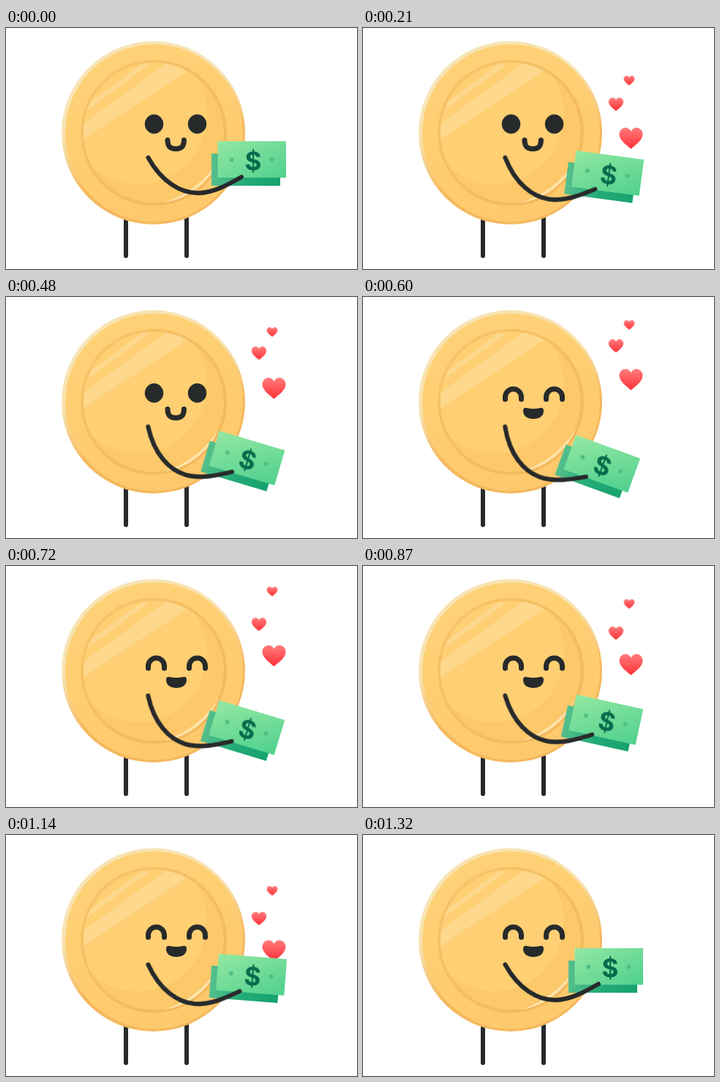
These frames come from a looping animation (480x330 px, 1380 ms). An HTML page without scripts:

```html
<!DOCTYPE html>
<html lang="en">
<head>
<meta charset="utf-8">
<title>Happy coin</title>
<style>
  html, body { margin: 0; width: 100%; height: 100%; overflow: hidden; background: #fff; }
  svg { display: block; width: 480px; height: 330px; }

  .arm, .hearts, .heart, .calm, .happy { animation: 1380ms linear infinite; }
  .arm { transform-origin: 194px 177px; animation-name: swing; }
  .hearts { animation-name: fade; }
  .large { animation-name: rise-large; }
  .medium { animation-name: rise-medium; }
  .small { animation-name: rise-small; }
  .calm, .happy { animation-timing-function: step-end; }
  .calm { animation-name: calm; }
  .happy { animation-name: happy; }

  .line { fill: none; stroke: #272a2b; stroke-width: 6; stroke-linecap: round; stroke-linejoin: round; }
  .thick { stroke-width: 7; }
  .dark { fill: #272a2b; }
  .dollar { font: 700 35px Inter, sans-serif; text-anchor: middle; fill: #056b4b; }

  /* Motion advances on a 30 ms beat */
  @keyframes swing {
    0% { transform: rotate(0deg); animation-timing-function: steps(7); }
    15.21% { transform: rotate(7.6deg); animation-timing-function: steps(9); }
    34.78% { transform: rotate(16.6deg); animation-timing-function: steps(4); }
    43.47% { transform: rotate(20deg); animation-timing-function: steps(4); }
    52.17% { transform: rotate(16.9deg); animation-timing-function: steps(5); }
    63.04% { transform: rotate(12.4deg); animation-timing-function: steps(9); }
    82.6% { transform: rotate(4.5deg); animation-timing-function: steps(6); }
    95.65%, 100% { transform: rotate(0deg); }
  }
  @keyframes rise-large {
    0% { transform: translateY(171px); animation-timing-function: steps(7); }
    15.21% { transform: translateY(151px); animation-timing-function: steps(9); }
    34.78% { transform: translateY(125px); animation-timing-function: steps(4); }
    43.47% { transform: translateY(113px); animation-timing-function: steps(4); }
    52.17% { transform: translateY(123px); animation-timing-function: steps(5); }
    63.04% { transform: translateY(135px); animation-timing-function: steps(9); }
    82.6% { transform: translateY(158.5px); animation-timing-function: steps(6); }
    95.65%, 100% { transform: translateY(172px); }
  }
  @keyframes rise-medium {
    0% { transform: translateY(125px); animation-timing-function: steps(7); }
    15.21% { transform: translateY(104.5px); animation-timing-function: steps(9); }
    34.78% { transform: translateY(77px); animation-timing-function: steps(4); }
    43.47% { transform: translateY(67px); animation-timing-function: steps(4); }
    52.17% { transform: translateY(80px); animation-timing-function: steps(5); }
    63.04% { transform: translateY(92px); animation-timing-function: steps(9); }
    82.6% { transform: translateY(114.5px); animation-timing-function: steps(6); }
    95.65%, 100% { transform: translateY(128px); }
  }
  @keyframes rise-small {
    0% { transform: translateY(91px); animation-timing-function: steps(7); }
    15.21% { transform: translateY(72px); animation-timing-function: steps(9); }
    34.78% { transform: translateY(48px); animation-timing-function: steps(7); }
    50% { transform: translateY(31px); animation-timing-function: steps(1); }
    52.17% { transform: translateY(35px); animation-timing-function: steps(5); }
    63.04% { transform: translateY(52px); animation-timing-function: steps(9); }
    82.6% { transform: translateY(76.5px); animation-timing-function: steps(6); }
    95.65%, 100% { transform: translateY(92px); }
  }
  @keyframes fade {
    0% { opacity: 0; animation-timing-function: steps(5); }
    10.86% { opacity: 1; }
    84.78% { opacity: 1; animation-timing-function: steps(5); }
    95.65%, 100% { opacity: 0; }
  }
  @keyframes calm { 0% { opacity: 1; } 43.47%, 100% { opacity: 0; } }
  @keyframes happy { 0% { opacity: 0; } 43.47%, 100% { opacity: 1; } }
</style>
</head>
<body>
<svg viewBox="0 0 480 330">
  <defs>
    <linearGradient id="rim" x1=".3" y1="0" x2=".7" y2="1">
      <stop offset=".35" stop-color="#f7e4b4"/>
      <stop offset=".65" stop-color="#f5b85d"/>
    </linearGradient>
    <linearGradient id="body" x1=".3" y1="0" x2=".7" y2="1">
      <stop stop-color="#ffd277"/>
      <stop offset="1" stop-color="#fec86b"/>
    </linearGradient>
    <linearGradient id="groove" x1=".1" y1=".1" x2=".9" y2=".9">
      <stop stop-color="#f6c469"/>
      <stop offset="1" stop-color="#f3b75b"/>
    </linearGradient>
    <linearGradient id="front" x2="1" y2="1">
      <stop stop-color="#93e8a2"/>
      <stop offset="1" stop-color="#4fd08e"/>
    </linearGradient>
    <linearGradient id="back">
      <stop stop-color="#55bf8c"/>
      <stop offset=".5" stop-color="#23ab77"/>
      <stop offset="1" stop-color="#17a26e"/>
    </linearGradient>
    <linearGradient id="red" x2="0" y2="1">
      <stop stop-color="#ff7c7c"/>
      <stop offset="1" stop-color="#ff3037"/>
    </linearGradient>
    <clipPath id="inside"><circle cx="202" cy="143.5" r="96"/></clipPath>
    <path id="heart" fill="url(#red)" d="M0 14.5C-6 9-16 3-16-5.5c0-5 4-9 8.5-9 3.5 0 6 2 7.5 5 1.5-3 4-5 7.5-5 4.5 0 8.5 4 8.5 9C16 3 6 9 0 14.5z"/>
    <path id="smiling-eye" d="M194.500 140v-3a11 11 0 0 1 22 0v3"/>
  </defs>

  <path class="line" d="M164 255V312M247 255V312"/>

  <g id="coin">
    <circle cx="201.500" cy="143.500" r="125.500" fill="url(#rim)"/>
    <circle cx="202.500" cy="144" r="121.500" fill="url(#body)"/>
    <circle cx="202" cy="143.500" r="100" fill="url(#groove)"/>
    <g clip-path="url(#inside)">
      <circle cx="202" cy="143.500" r="96" fill="#fcc869"/>
      <circle cx="180" cy="119" r="95" fill="#ffcf73"/>
      <path fill="#fdd88d" d="M100 156L252 56L235 37L100 135zM100 121L195 51L186 49L100 113z"/>
    </g>
    <path fill="#fde3a9" d="M215 239.500A97 97 0 0 0 291 181A140 140 0 0 1 215 239.500z"/>
  </g>

  <g class="calm">
    <ellipse class="dark" cx="202.500" cy="131.500" rx="12.700" ry="13.200"/>
    <ellipse class="dark" cx="261.500" cy="131.500" rx="12.700" ry="13.200"/>
    <path class="line thick" d="M221 153.500c0 8 3 12 11.200 12s11.200-4 11.200-12"/>
  </g>
  <g class="happy">
    <g class="line thick">
      <use href="#smiling-eye"/>
      <use href="#smiling-eye" x="56"/>
    </g>
    <path class="dark" d="M219 156q0-5 5-4 9 2 18 0 5-1 5 4c0 7-6 11-14 11s-14-4-14-11z"/>
  </g>

  <g class="hearts">
    <g class="heart large"><use href="#heart" transform="translate(366.500)"/></g>
    <g class="heart medium"><use href="#heart" transform="translate(346) scale(.63)"/></g>
    <g class="heart small"><use href="#heart" transform="translate(364) scale(.46)"/></g>
  </g>

  <g class="arm">
    <rect x="281" y="172" width="94" height="44" fill="url(#back)"/>
    <rect x="289.500" y="155" width="93.500" height="50" fill="url(#front)"/>
    <g fill="#4fbd84">
      <circle cx="308.500" cy="180.500" r="2.900"/>
      <circle cx="363.500" cy="180.500" r="2.900"/>
    </g>
    <text class="dollar" x="338" y="194.500">$</text>
    <path class="line" d="M194.500 177.500C213 211 239 226 262 226C283 226 303 215 322 204"/>
  </g>
</svg>
</body>
</html>
```
